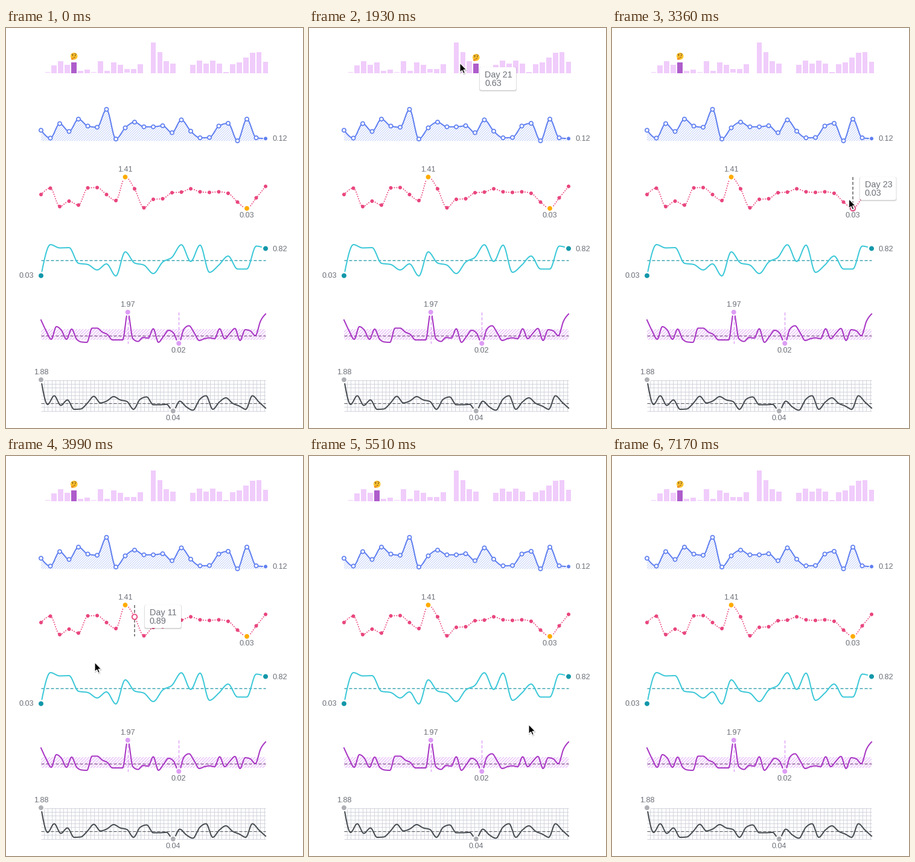
Write a matplotlib script that moves like this. It is 492x663 px and loops after 7800 ms.

```python
import numpy as np
import matplotlib.pyplot as plt
from matplotlib.animation import FuncAnimation
from matplotlib.patches import Circle, Ellipse, FancyBboxPatch, Polygon, Rectangle

W, H = 492, 663
LOOP, STEP = 7800, 50
LEFT, RIGHT = 58, 430
LAG = 60  # the hover trails the pointer by this many ms

BLUE, PINK, ORANGE = "#5f7ff0", "#e9467f", "#ffab00"
CYAN, TEAL = "#3bc8d8", "#1197a9"
PURPLE, LILAC = "#a834c4", "#dd9df5"
BAR, BAR_ON = "#f0ccfb", "#ae5ccb"
DARK, GRAY, INK = "#464b50", "#aeb0b5", "#6c7078"

plt.rcParams["font.family"] = "Liberation Sans"
fig = plt.figure(figsize=(W / 72, H / 72), dpi=72, facecolor="white")
ax = fig.add_axes([0, 0, 1, 1])
ax.set_xlim(0, W)
ax.set_ylim(H, 0)
ax.axis("off")


def smooth(x, y, at):
    """Monotone cubic through (x, y), read at the given places."""
    x, y, at = (np.asarray(a, float) for a in (x, y, at))
    h = np.diff(x)
    s = np.diff(y) / h
    p = (s[:-1] * h[1:] + s[1:] * h[:-1]) / (h[:-1] + h[1:])
    low = np.minimum(np.minimum(abs(s[:-1]), abs(s[1:])), abs(p) / 2)
    m = np.zeros(len(x))
    m[1:-1] = (np.sign(s[:-1]) + np.sign(s[1:])) * low
    m[0] = (3 * s[0] - m[1]) / 2
    m[-1] = (3 * s[-1] - m[-2]) / 2
    i = np.clip(np.searchsorted(x, at, side="right") - 1, 0, len(h) - 1)
    u = np.clip((at - x[i]) / h[i], 0, 1)
    v = 1 - u
    return (y[i] * (1 + 2 * u) * v**2 + y[i + 1] * (3 - 2 * u) * u**2
            + h[i] * u * v * (m[i] * v - m[i + 1] * u))


class Row:
    """One sparkline: pixel heights plus what is needed to read values back."""

    def __init__(self, ys, zero, scale, tip_y, **look):
        self.y = np.array(ys, float)
        self.x = np.linspace(LEFT, RIGHT, len(ys))
        self.zero, self.scale, self.tip_y, self.look = zero, scale, tip_y, look

    def curve(self):
        xs = np.linspace(LEFT, RIGHT, (len(self.x) - 1) * 10 + 1)
        return xs, smooth(self.x, self.y, xs)

    def nearest(self, x):
        return int(np.argmin(abs(self.x - x)))

    def value(self, i):
        return abs(self.zero - self.y[i]) / self.scale


bars = Row([73.8, 73.4, 62, 55, 61, 57, 71, 69, 73.3, 54.5, 71, 57, 61, 68.3, 67.5,
            59.5, 74.5, 23.5, 40, 55, 59, 74.5, 74.5, 61, 53.5, 59, 53.5, 59, 73,
            60, 57, 48.5, 41, 40, 56], 74.5, 24.6, 65)
blue = Row([169.5, 182.5, 158.5, 171.5, 151, 162.5, 164.5, 134.8, 184, 165.5, 156,
            163.8, 163.8, 162, 173.5, 152.3, 171, 182, 181.5, 162.5, 158, 187, 151,
            182, 183.3], 186.9, 30.1, 157, line="#222222", lw=1.2, face=BLUE, edge="w")
pink = Row([276, 265.5, 296, 287, 293.5, 265, 264.5, 276, 286, 247, 266.6, 298, 284,
            283, 273, 272, 266.5, 271.5, 272.5, 271.5, 274, 288.5, 299, 281.5, 262.5],
           300.1, 37.68, 247, line="#888888", lw=2, face="w", edge=PINK)
cyan = Row([410.5, 359, 364.5, 364, 390, 392, 401, 391, 411, 371, 389.5, 393, 407, 388,
            380, 359.2, 387, 359.8, 405, 393, 378, 399.5, 399.5, 361.5, 365.5],
           412.2, 57, 358, line="#222222", lw=1.2, face=ORANGE, edge="w")
violet = Row([484, 502, 516, 495, 501, 516, 499, 516, 520.5, 521, 497.5, 497.5, 504,
              508, 517, 517, 517, 471, 515, 519.5, 513, 514, 498.5, 521, 511, 501, 506,
              522.7, 499, 493.5, 505, 518, 515, 513.5, 515, 498.5, 515, 506, 498, 518,
              500.1, 502, 510, 486, 474],
             523.2, 26.5, 476, line="#777777", lw=2, face=LILAC, edge="w")
dark = Row([583, 624, 609.5, 625.5, 616.5, 632, 631.5, 622, 610.5, 621.5, 618, 611,
            616.5, 619, 632, 615.5, 611.5, 624.5, 624.5, 623.8, 634.8, 618.5, 628, 633.5,
            616, 609.5, 632, 620, 613, 622, 626.5, 632, 609.5, 620, 630], 636, 28.2, 0)


def dot(x, y, r, face, edge="w", lw=2, z=5):
    return ax.add_patch(Circle((x, y), r, fc=face, ec=edge, lw=lw, zorder=z))


def dashes(x, y, color, lw=1.2, on=5, off=3, z=2):
    return ax.plot(x, y, color=color, lw=lw, zorder=z, dash_capstyle="butt",
                   ls=(0, (on / lw, off / lw)))[0]


def label(x, y, text, ha="center", size=12.6, z=6):
    return ax.text(x, y, text, ha=ha, va="baseline", size=size, color=INK, zorder=z)


def segments(pairs, color, lw, clip=None):
    """Many straight strokes as one broken line."""
    xs, ys = [], []
    for x0, y0, x1, y1 in pairs:
        xs += [x0, x1, np.nan]
        ys += [y0, y1, np.nan]
    line = ax.plot(xs, ys, color=color, lw=lw, zorder=1, solid_capstyle="butt")[0]
    if clip is not None:
        ax.add_patch(clip)
        line.set_clip_path(clip)


def hatch(top, bottom, pitch, color, lw, clip):
    rise = bottom - top
    starts = np.arange(LEFT - rise, RIGHT, pitch)
    segments([(s, bottom, s + rise, top) for s in starts], color, lw, clip)


def stroke(row, color):
    ax.plot(*row.curve(), color=color, lw=2, zorder=3, solid_joinstyle="round")


def draw_static():
    for x, y in zip(bars.x, bars.y):
        ax.add_patch(Rectangle((x - 4.4, y), 8.8, 74.5 - y, fc=BAR, ec="none"))

    xs, ys = blue.curve()
    area = np.column_stack([np.r_[xs, RIGHT, LEFT], np.r_[ys, 187.5, 187.5]])
    hatch(134, 187.5, 4, "#bccbfa", 0.9, Polygon(area, fc="none", ec="none"))
    stroke(blue, BLUE)
    for x, y in zip(blue.x[:-1], blue.y):
        dot(x, y, 3.1, "w", BLUE, 1.7)
    dot(RIGHT, 183.3, 3.6, BLUE, lw=1.2)
    label(442, 187, "0.12", "left")

    ax.plot(*pink.curve(), color=PINK, lw=2, ls=(0, (0.05, 1.9)), dash_capstyle="round",
            zorder=3)
    for i, (x, y) in enumerate(zip(pink.x, pink.y)):
        if i in (9, 22):
            dot(x, y, 4.9, ORANGE)
        else:
            dot(x, y, 3, PINK, "none", 0)
    label(197.5, 238.3, "1.41")
    label(399, 314.4, "0.03")

    dashes([LEFT, RIGHT], [384.8] * 2, "#2f9dab", 1.4)
    stroke(cyan, CYAN)
    for i in (0, -1):
        dot(cyan.x[i], cyan.y[i], 5.3, TEAL, lw=2.6)
    label(46, 414.2, "0.03", "right")
    label(442, 369.5, "0.82", "left")

    hatch(499, 517, 5, "#e3b4f7", 1.1,
          Rectangle((LEFT, 499), RIGHT - LEFT, 18, fc="none", ec="none"))
    dashes([LEFT, RIGHT], [509.5] * 2, "#6e3a7c", 1.1)
    for i in (17, 27):
        dashes([violet.x[i]] * 2, [471, 523], LILAC, 1.4)
        dot(violet.x[i], violet.y[i], 5, LILAC)
    stroke(violet, PURPLE)
    label(201.7, 462.3, "1.97")
    label(286.3, 538.3, "0.02")

    pitch = 6.4
    grid = [(x, 583, x, 635) for x in np.arange(LEFT + 5, RIGHT, pitch)]
    grid += [(LEFT, y, RIGHT, y) for y in np.arange(583.5, 636, pitch)]
    segments(grid, "#cfd1da", 0.9)
    dashes([LEFT, RIGHT], [621.5] * 2, "#55595e", 1.1)
    stroke(dark, DARK)
    for i in (0, 20):
        dot(dark.x[i], dark.y[i], 5, GRAY)
    label(58, 574.3, "1.88")
    label(276.8, 650.3, "0.04")


# time, x, y of the pointer; equal neighbours are pauses
PATH = np.array([
    (800, 488, 15), (1470, 368, 60), (1650, 368, 60), (1865, 272, 58), (1925, 250, 58),
    (2390, 122, 150), (2440, 122, 150), (2715, 290, 146), (2775, 312, 146),
    (3190, 396, 256), (3250, 396, 258), (3330, 400, 275), (3540, 336, 302),
    (3710, 336, 302), (3915, 219, 322), (3975, 147, 342), (4140, 119, 385),
    (4450, 164, 416), (4510, 164, 416), (4765, 293, 405), (4825, 305, 405),
    (5210, 349, 435), (5390, 349, 435), (5800, 408, 490), (6015, 394, 518),
    (6075, 378, 524), (6130, 376, 528), (6190, 376, 528), (6740, 224, 558),
    (6940, 233, 575), (7050, 233, 575), (7170, 460, 590)])

# when each row reacts to the pointer
HOVERS = [(1040, 2080, bars), (2230, 3260, blue), (3260, 4060, pink),
          (4150, 5480, cyan), (5560, 6700, violet)]

ARROW = np.array([(0, 0), (0, 15.6), (3.6, 12.3), (5.9, 17.6), (8.4, 16.5),
                  (6.2, 11.3), (11, 11.3)])


def pointer(t):
    return [float(smooth(PATH[:, 0], PATH[:, k], t)) for k in (1, 2)]


live = []


def show(*items):
    live.extend(items)


def box(x, y, w, h, **look):
    shape = "round,pad=0,rounding_size=3"
    return ax.add_patch(FancyBboxPatch((x, y), w, h, boxstyle=shape, **look))


def emoji(x, y):
    def blob(dx, dy, w, h, color, angle=0):
        show(ax.add_patch(Ellipse((x + dx, y + dy), w, h, angle=angle, fc=color,
                                  ec="none", zorder=8)))

    blob(0, 0, 11.6, 11.6, "#fdc52f")
    blob(-2.2, -1.2, 1.5, 2.1, "#59340f")
    blob(2, -1.2, 1.5, 2.1, "#59340f")
    blob(0.6, 2, 3.8, 0.9, "#6e4212", -12)
    show(ax.plot([x - 3.8, x - 1.2], [y - 3.2, y - 3.4], color="#7a4a14", lw=0.8, zorder=8)[0],
         ax.plot([x + 1, x + 3.8], [y - 4.2, y - 3.4], color="#7a4a14", lw=0.8, zorder=8)[0])
    blob(-2.4, 4.2, 5.2, 3.6, "#f0921e", -15)
    blob(-0.3, 3.4, 4, 1.3, "#f7a52a", -20)


def tooltip(x, y, day, value):
    w = 60 if day > 9 else 52
    for grow, alpha in ((1.6, 0.04), (0.9, 0.06), (0.3, 0.09)):
        show(box(x - grow, y + 1 - grow, w + 2 * grow, 38 + 2 * grow, fc="black",
                 ec="none", alpha=alpha, zorder=9))
    show(box(x, y, w, 38, fc="white", ec="none", zorder=10),
         label(x + 8, y + 17, f"Day {day}", "left", 14.4, 11),
         label(x + 8, y + 31, f"{value:.2f}", "left", 14.4, 11))


def mark_bar(i):
    x, y = bars.x[i], bars.y[i]
    show(ax.add_patch(Rectangle((x - 4.4, y), 8.8, 74.5 - y, fc=BAR_ON, ec="none",
                                zorder=3)))
    emoji(x, max(y - 10.3, 24))


def mark_point(row, i):
    look = row.look
    x = row.x[i]
    show(dashes([x, x], [row.y.min(), row.y.max()], look["line"], look["lw"], 5, 3, 6),
         dot(x, row.y[i], 4.2, look["face"], look["edge"], 1.8, 7))


def arrow(x, y):
    show(ax.add_patch(Polygon(ARROW + (x + 0.5, y + 1.5), fc="black", ec="black", lw=1.6,
                              alpha=0.12, zorder=12)),
         ax.add_patch(Polygon(ARROW + (x, y), fc="black", ec="white", lw=1.2,
                              joinstyle="round", zorder=13)))


def update(frame):
    while live:
        live.pop().remove()
    t = frame * STEP + STEP / 2
    row = next((r for a, b, r in HOVERS if a <= t < b), None)
    bar = 5
    if row is not None:
        x = pointer(t - LAG)[0]
        i = row.nearest(x)
        if row is bars:
            bar = i
        else:
            mark_point(row, i)
        tooltip(x + 11, row.tip_y, i + 1, row.value(i))
    mark_bar(bar)
    if 810 < t < 7170:
        arrow(*pointer(t))
    return live


draw_static()
anim = FuncAnimation(fig, update, frames=LOOP // STEP, interval=STEP, repeat=True,
                     init_func=lambda: [], blit=False)
plt.show()
```
